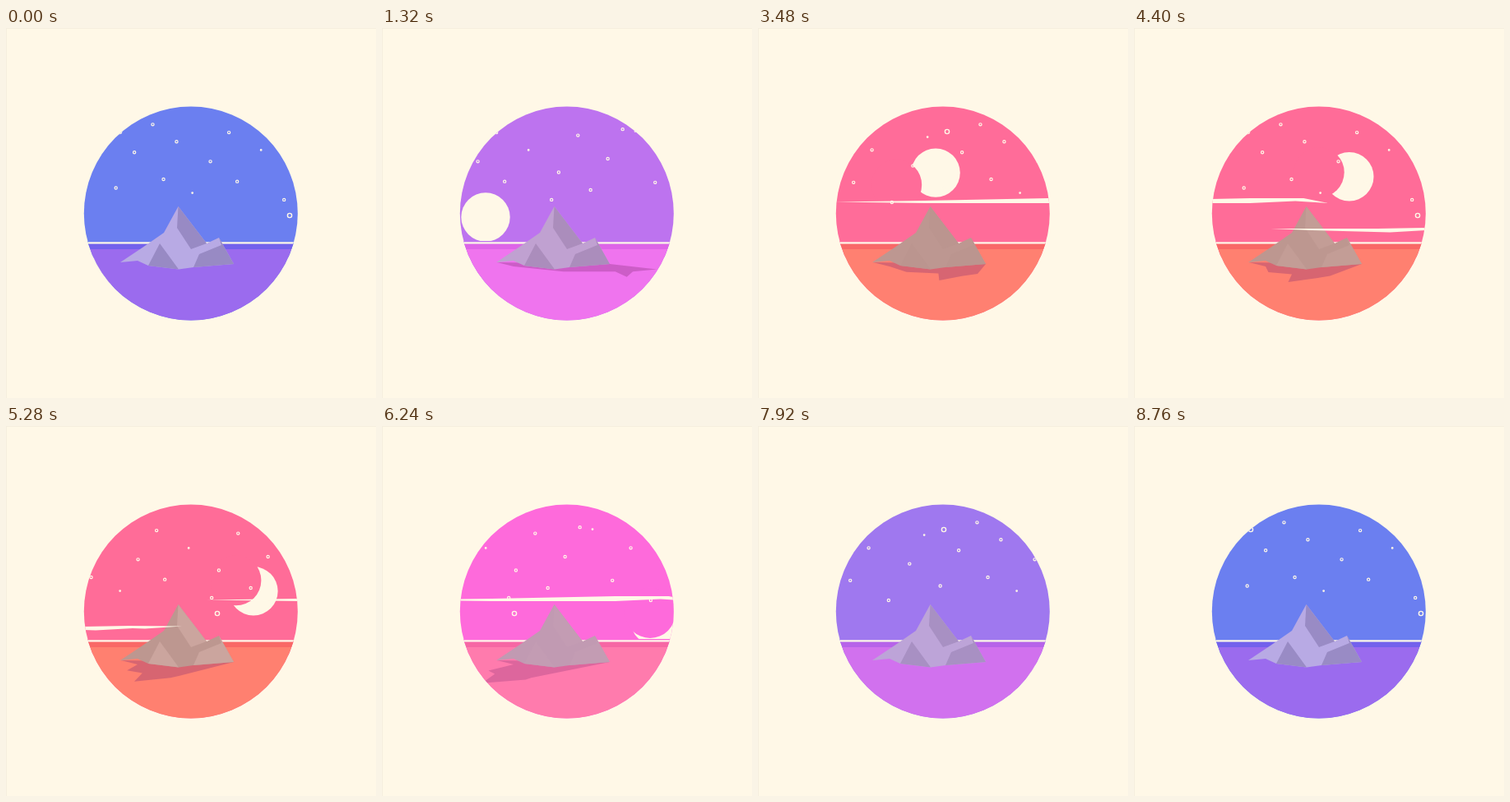
These frames come from a looping animation (450x450 px, 8.8 s). An HTML page with a canvas:

```html
<!DOCTYPE html>
<html lang="en">
<head>
<meta charset="utf-8">
<title>Moonrise island</title>
<style>
  html, body { margin: 0; width: 100%; height: 100%; overflow: hidden; background: #fff8e7; }
  canvas { display: block; }
</style>
</head>
<body>
<canvas id="stage" width="450" height="450"></canvas>
<script>
const ctx = document.getElementById('stage').getContext('2d');
const LOOP = 8.8, STEP = 0.04, CREAM = '#fff8e7';
const STAR_SPAN = 440, STAR_SPEED = 100, CLOUD_SPEED = 230;

const clamp = u => Math.max(0, Math.min(1, u));
const mix = (a, b, u) => a.map((v, i) => v + (b[i] - v) * u);
const rgb = hex => [0, 2, 4].map(i => parseInt(hex.substr(i, 2), 16));
const css = c => `rgb(${c.map(Math.round)})`;

// Colour ramps: night, dusk, day
const ramp = list => list.split(' ').map(rgb);
const SKY = ramp('6b7ff0 fe6aee ff6c98');
const SEA = ramp('9b6bee ff76ee ff8070');
const STRIP = ramp('7361ec f265e6 f96866');
const ROCK = ramp('b8aae4 c49cc6 bd9790');

// Colour at a distance in seconds from midday, which lies half way through the loop
function tone([night, dusk, day], away, duskAt) {
  return away > duskAt
    ? mix(dusk, night, clamp((away - duskAt) / (4.3 - duskAt)))
    : mix(day, dusk, clamp((away - 0.9) / (duskAt - 0.9)));
}

// Shadow outline at sunrise and sunset of the moon
const SHADOW_START = [245, 296, 323, 295, 345, 300, 340, 293, 375, 290];
const SHADOW_END = [82, 298, 61, 304, 30, 318, 107, 315, 102, 313];

const HIGH_CLOUD = [0, 211.5, 110, 210, 260, 207, 325, 207, 355, 213, 315, 210.5, 260, 213, 110, 213];
const LOW_CLOUD = [0, 244, 130, 244, 185, 243, 250, 243.5, 205, 246.5, 190, 246, 145, 248.5, 50, 246];

// Evenly scattered rings and dots, with two large rings among them
let seed = 7;
const random = () => (seed = seed * 16807 % 2147483647) / 2147483647;
const stars = Array.from({ length: 22 }, (_, i) => ({
  x: (i + random()) * STAR_SPAN / 22,
  y: 116 + 104 * ((i * 0.618 + 0.1 * random()) % 1),
  r: random() < 0.35 ? 0.8 : 1.6
}));
stars.push({ x: 138, y: 126, r: 2.6 }, { x: 345, y: 228, r: 2.6 });

function poly(points, fill, dx = 0) {
  ctx.beginPath();
  for (let i = 0; i < points.length; i += 2) ctx.lineTo(points[i] + dx, points[i + 1]);
  ctx.fillStyle = fill;
  ctx.fill();
}

function rect(y, h, fill) {
  ctx.fillStyle = fill;
  ctx.fillRect(90, y, 270, h);
}

// Disc on the moon's orbit, angle in degrees from the top
function orbit(deg, r, fill) {
  const a = deg * Math.PI / 180;
  ctx.beginPath();
  ctx.arc(227 + 121 * Math.sin(a), 296.6 - 121 * Math.cos(a), r, 0, 7);
  ctx.fillStyle = fill;
  ctx.fill();
}

function drawStars(t) {
  ctx.strokeStyle = CREAM;
  for (const { x, y, r } of stars) {
    const left = (x - t * STAR_SPEED + 3 * STAR_SPAN) % STAR_SPAN;
    ctx.beginPath();
    ctx.arc(left, y, r, 0, 7);
    ctx.lineWidth = r > 2 ? 1.4 : 1.2;
    ctx.stroke();
  }
}

function drawMountain(t, away) {
  const rock = tone(ROCK, away, 2.4);
  // The turned faces go from shaded to lit as the moon passes over
  const lit = t < 5.28 ? t / 5.28 : (LOOP - t) / (LOOP - 5.28);
  const face = css(rock.map(v => v - 32 + 46 * lit));
  poly([139, 285, 166, 267, 192, 249, 209.5, 217, 244, 262, 259, 255, 277, 287,
    228, 291, 210, 293.5, 173, 289, 160, 283], css(rock));
  poly([209.5, 217, 244, 262, 225, 269, 208, 243], face);
  poly([187, 262, 210, 293.5, 173, 289], face);
  poly([259, 255, 277, 287, 228, 291, 235, 275, 262, 264], face);
}

function draw(t) {
  const away = Math.abs(t - LOOP / 2);
  const sky = css(tone(SKY, away, 2.1));
  const cloud = (shape, enter) => poly(shape, CREAM, 355 - CLOUD_SPEED * (t - enter));

  ctx.fillStyle = '#f5eedf';
  ctx.fillRect(0, 0, 450, 450);
  ctx.fillStyle = CREAM;
  ctx.fillRect(1, 1, 449, 449);

  ctx.save();
  ctx.beginPath();
  ctx.arc(224.8, 225.5, 130, 0, 7);
  ctx.clip();

  rect(90, 270, sky);
  orbit(-88 + 23.8 * t, 29.7, CREAM);
  orbit(-134.7 + 30.4 * t, 30.7, sky);
  rect(259, 20, sky);
  drawStars(t);

  rect(260.3, 2.4, CREAM);
  rect(262.7, 6.3, css(tone(STRIP, away, 2.85)));
  rect(269, 90, css(tone(SEA, away, 2.85)));

  const shade = 0.32 * clamp(Math.min(t / 0.8, (7.6 - t) / 1.6));
  poly([140, 285, 160, 290, ...mix(SHADOW_START, SHADOW_END, t / LOOP), 277, 287],
    `rgba(130, 45, 115, ${shade})`);
  drawMountain(t, away);

  cloud(HIGH_CLOUD, 2.34);
  cloud(LOW_CLOUD, 3.58);
  cloud(HIGH_CLOUD, 4.8);
  ctx.restore();
}

const begin = performance.now();
function frame() {
  const t = (performance.now() - begin) / 1000 % LOOP;
  draw(Math.floor(t / STEP) * STEP);
  requestAnimationFrame(frame);
}
frame();
</script>
</body>
</html>
```
